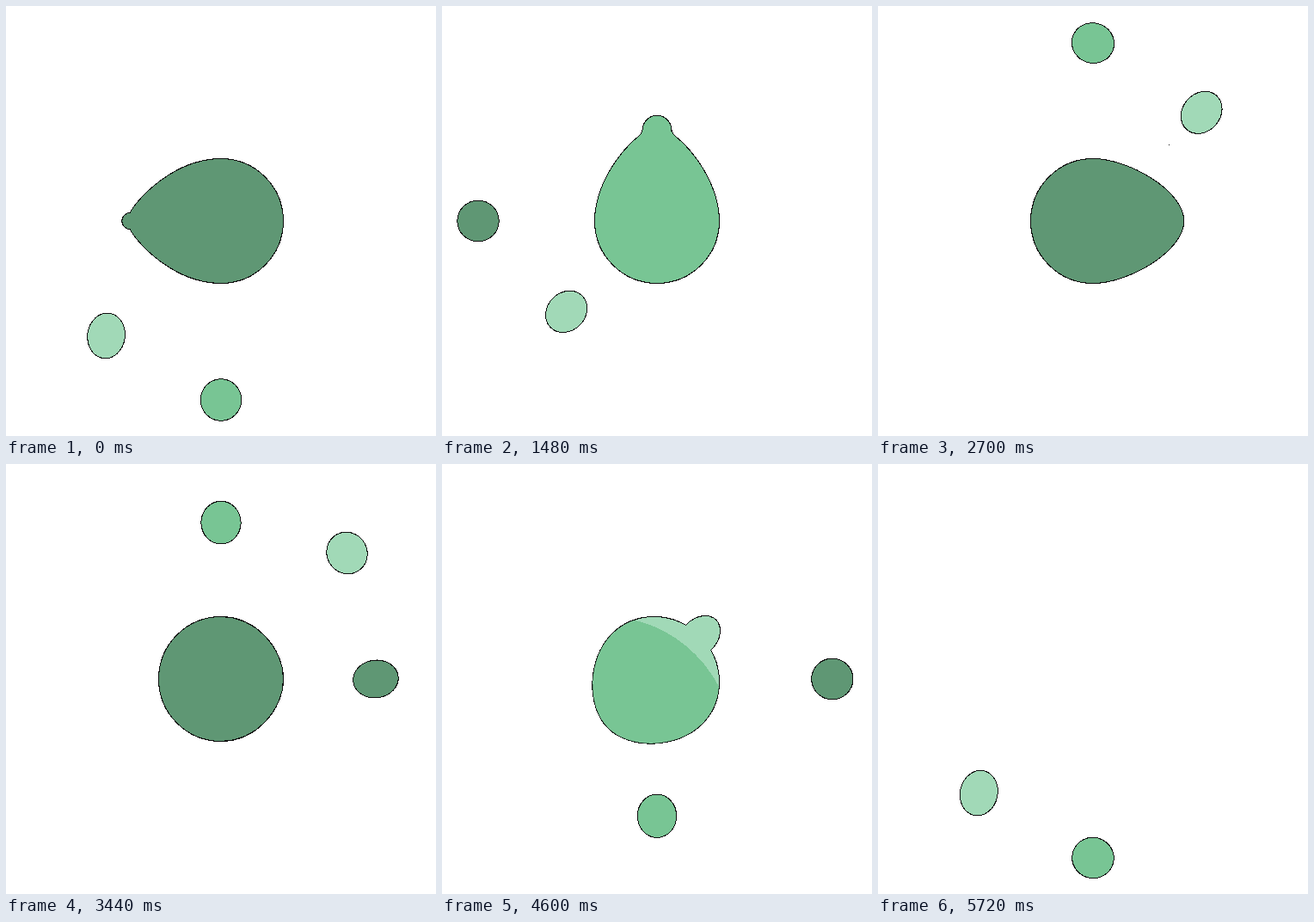
Recreate the animation shown at these times as an HTML page. Size 500 by 500 pixels, loop 5.74 s.

```html
<!DOCTYPE html>
<html lang="en">
<head>
<meta charset="utf-8">
<title>Droplets</title>
<style>
  html, body { margin: 0; width: 100%; height: 100%; overflow: hidden; background: #fff; }
  svg { display: block; width: 100%; height: 100%; }
</style>
</head>
<body>
<svg viewBox="0 0 500 500" shape-rendering="crispEdges">
  <defs><clipPath id="bodyClip"><path id="clipShape"/></clipPath></defs>
  <g id="stage" transform="translate(250 250)"></g>
</svg>
<script>
const LOOP = 5740, HALF = LOOP / 2, TURN = HALF / 2;
const ENTRY = -475;   // phase at which a drop touches the body
const SPLIT = 235;    // phase at which its neck breaks on the far side
const RADIUS = 72, REACH = 208, DROP = 23.5;
const NS = 'http://www.w3.org/2000/svg';

const clamp = x => Math.min(1, Math.max(0, x));
const mix = (a, b, k) => a + (b - a) * k;
const bell = (x, width) => Math.exp(-((x / width) ** 2));
const smooth = (from, to, x) => {
  const k = clamp((x - from) / (to - from));
  return k * k * (3 - 2 * k);
};

function add(parent, tag, attrs = {}) {
  const node = parent.appendChild(document.createElementNS(NS, tag));
  set(node, attrs);
  return node;
}
function set(node, attrs) {
  for (const name in attrs) node.setAttribute(name, attrs[name]);
}

// Ellipse whose long axis may be turned away from the line of flight.
function ellipse(x, rx, ry, degrees = 0) {
  const a = degrees * Math.PI / 180, dx = rx * Math.cos(a), dy = rx * Math.sin(a);
  const arc = `A${rx} ${ry} ${degrees} 1 1 `;
  return `M${x - dx} ${-dy}${arc}${x + dx} ${dy}${arc}${x - dx} ${-dy}Z`;
}

// Pushed out slowly, then falls back ever faster.
function distance(p) {
  if (p < -60) return (p - ENTRY) / 2 - 96;
  if (p > TURN) return REACH - 112 * ((p - TURN) / 960) ** 2.8;
  const flight = REACH - 48 * ((TURN - p) / 1130) ** 2;
  return mix(105, flight, smooth(40, 260, p));
}

function bodyPath(p) {
  const squash = 2 * bell(p - ENTRY, 150), back = RADIUS - squash, girth = RADIUS + squash;
  const push = 1 - (1 - clamp((p - ENTRY) / 450)) ** 2;
  const tip = RADIUS + 37 * push * (1 - smooth(40, SPLIT, p));
  const sharp = bell(p, 90), shoulder = 40 + 20 * sharp, point = 36 - 22 * sharp;
  return `M${-back} 0A${back} ${girth} 0 0 1 0 ${-girth}`
    + `C${shoulder} ${-girth} ${tip} ${-point} ${tip} 0`
    + `C${tip} ${point} ${shoulder} ${girth} 0 ${girth}`
    + `A${back} ${girth} 0 0 1 ${-back} 0Z`;
}

function neckPath(p, x, size) {
  const k = (SPLIT - p) / 200, foot = 28 + 16 * k, waist = 27 * k;
  const mid = mix(65, x, 0.6), end = size * 0.95;
  return `M65 ${-foot}Q${mid} ${-waist} ${x} ${-end}L${x} ${end}Q${mid} ${waist} 65 ${foot}Z`;
}

function dropPath(p) {
  if (p > -340 && p < -25) return '';
  const entering = p < -25;
  const x = distance(p);
  const size = entering ? DROP : DROP * (1 - Math.exp(-(p + 30) / 60));
  const fall = entering ? 1 : clamp((p - TURN) / 960);
  const stretch = Math.sqrt(1 + 0.22 * bell(p - 700, 500) + 0.36 * fall ** 3);
  const spin = p < TURN ? -75 * smooth(480, 960, p) : 0;
  let d = ellipse(x, size * stretch, size / stretch, spin);
  if (p > 0 && p < SPLIT) d += neckPath(p, x, size);
  if (p > 300 && p < 570) {
    const left = (570 - p) / 335;
    d += ellipse(126, 4 * left, 2.5 * left);
  }
  return d;
}

const stage = document.getElementById('stage');
const clipShape = document.getElementById('clipShape');

// Angles point to the side where the first half of the loop ends.
const drops = [
  { color: '#5f9774', angle: 180, offset: 0 },
  { color: '#78c594', angle: -90, offset: HALF / 2 },
  { color: '#a1d9b7', angle: 135, offset: -HALF / 4 }
].map(drop => {
  const group = add(stage, 'g');
  return {
    ...drop, group,
    line: add(group, 'path', { fill: 'none', stroke: '#111', 'stroke-width': 2 }),
    fill: add(group, 'path', { fill: drop.color }),
    stain: add(group, 'circle', { cx: 99, cy: -11, 'clip-path': 'url(#bodyClip)' })
  };
});

function render(t) {
  for (const drop of drops) {
    const q = (t - drop.offset - ENTRY + LOOP) % LOOP;
    drop.phase = q % HALF + ENTRY;
    drop.turn = drop.angle + (q >= HALF ? 180 : 0);
  }
  const [owner, previous] = [...drops].sort((a, b) => a.phase - b.phase);
  for (const drop of drops) {
    const p = drop.phase, body = drop === owner ? bodyPath(p) : '';
    const d = body + dropPath(p);
    set(drop.line, { d });
    set(drop.fill, { d });
    set(drop.group, { transform: `rotate(${drop.turn})`, visibility: 'visible' });
    // The former colour drains towards the exit side.
    const drain = body ? clamp((-176 - p) / 299) : 0;
    set(drop.stain, { r: 180 * drain ** 0.9, fill: previous.color });
    if (body) set(clipShape, { d: body });
  }
  if (stage.lastChild !== owner.group) stage.appendChild(owner.group);
  // The body blinks out just before the loop restarts.
  if (t >= LOOP - 20) set(owner.group, { visibility: 'hidden' });
}

const start = performance.now();
function tick() {
  render((performance.now() - start) % LOOP);
  requestAnimationFrame(tick);
}
tick();
</script>
</body>
</html>
```
